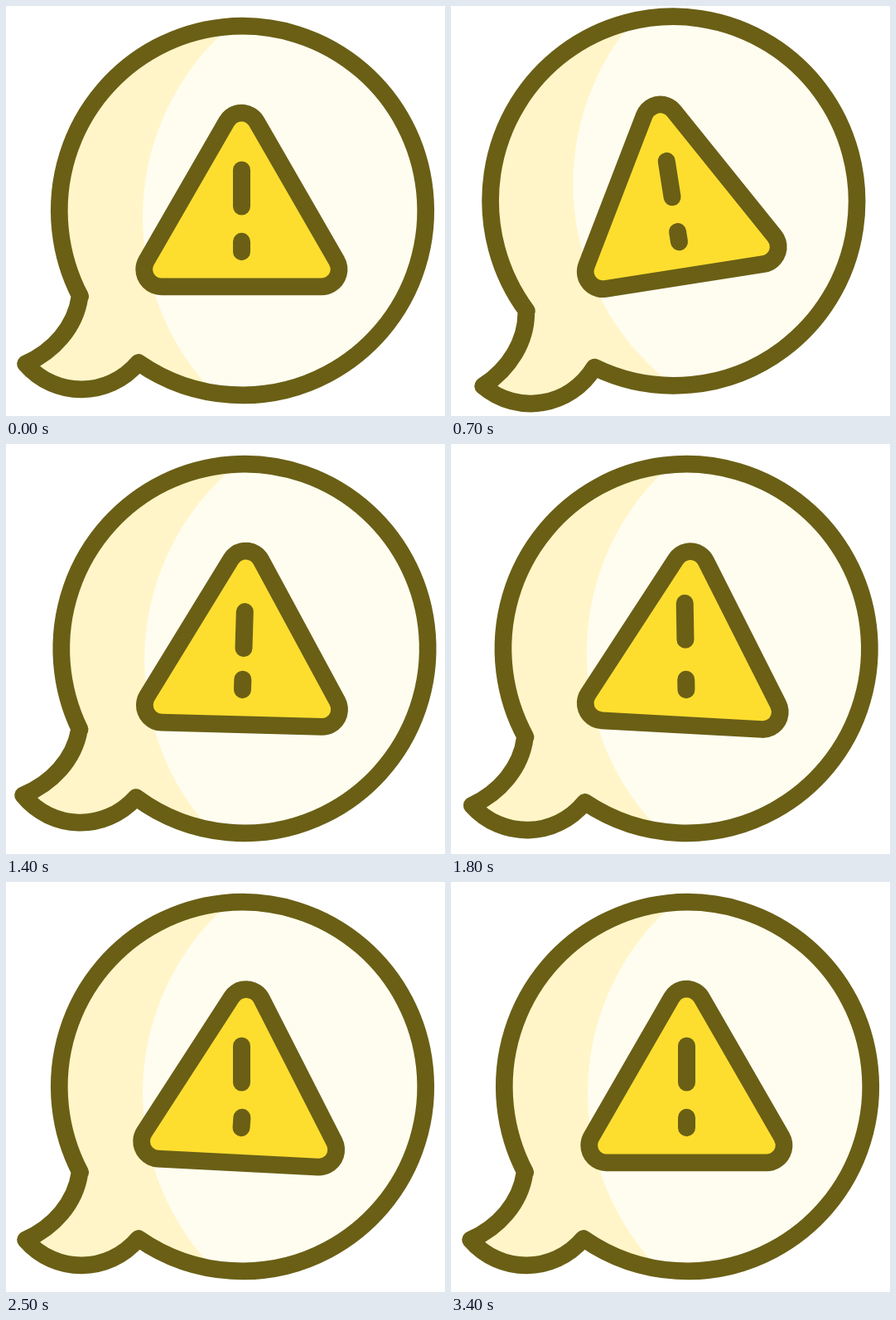
Recreate the animation shown at these times as an HTML page with a canvas. Size 530 px wide and 495 px high, loop 3.5 s.

```html
<!DOCTYPE html>
<html lang="en">
<head>
<meta charset="utf-8">
<title>Warning bubble</title>
<style>
html, body { margin: 0; width: 530px; height: 495px; overflow: hidden; background: #fff; }
canvas { display: block; }
</style>
</head>
<body>
<canvas id="stage" width="530" height="495"></canvas>
<script>
const ctx = document.getElementById('stage').getContext('2d');
const LOOP = 3500, STEP = 100;
const INK = '#6a5f15', SHADE = '#fff5c8', CREAM = '#fffdf0', YELLOW = '#fdde2f';
const CX = 285.5, CY = 247, RX = 221.2, RY = 222.8;

const clamp = x => Math.min(1, Math.max(0, x));
const ease = s => s * s * s * (10 - 15 * s + 6 * s * s);

// Starts at 0 and eases to each [from, to, value] stop in turn.
const swing = (...stops) => t => {
  let v = 0;
  for (const [from, to, value] of stops) v += (value - v) * ease(clamp((t - from) / (to - from)));
  return v;
};

// Wind up, snap back, then settle.
const tilt = swing([0, 430, 9], [540, 740, -10], [900, 1210, 4], [1210, 1620, -1.3], [1620, 2100, 0]);
const lift = swing([540, 740, 1], [870, 1210, 0]);
const signTilt = swing([700, 1000, -6], [1000, 1740, 4.1], [2200, 3000, 0]);
const barDrop = swing([700, 1100, 10.5], [1100, 1800, -5.7], [1800, 2300, 0]);
const dotTilt = swing([2100, 2500, 4], [2500, 2900, 0]);

function bubblePath() {
  const angle = (x, y) => Math.atan2((y - CY) / RY, (x - CX) / RX);
  const p = new Path2D();
  p.ellipse(CX, CY, RX, RY, 0, angle(89, 351), angle(159.5, 431) + 2 * Math.PI);
  p.bezierCurveTo(123.6, 473.5, 59.4, 473.5, 23.5, 432);
  p.bezierCurveTo(57.2, 417, 83.9, 387.5, 89, 351);
  p.closePath();
  return p;
}

const bubble = bubblePath();
const triangle = new Path2D('M284.4 150L381.2 318H187.6Z');

function scoped(fn) {
  ctx.save();
  fn();
  ctx.restore();
}

function spin(deg, x, y) {
  ctx.translate(x, y);
  ctx.rotate(deg * Math.PI / 180);
  ctx.translate(-x, -y);
}

function outline(path, color, width) {
  ctx.strokeStyle = color;
  ctx.lineWidth = width;
  ctx.stroke(path);
}

function padded(path, color, width) {
  ctx.fillStyle = color;
  ctx.fill(path);
  outline(path, color, width);
}

const dash = (y, length) => outline(new Path2D(`M284.5 ${y}v${length}`), INK, 21);

function drawBubble() {
  scoped(() => {
    ctx.clip(bubble);
    ctx.fillStyle = SHADE;
    ctx.fillRect(0, 0, 530, 495);
    ctx.fillStyle = CREAM;
    ctx.beginPath();
    ctx.arc(469.5, 255, 304.5, 0, 2 * Math.PI);
    ctx.fill();
  });
  outline(bubble, INK, 20.7);
}

function drawSign(t) {
  scoped(() => {
    spin(signTilt(t), 279, 256);
    padded(triangle, INK, 62.5);
    padded(triangle, YELLOW, 21);
  });
  dash(198 + barDrop(t), 44);
  scoped(() => {
    spin(dotTilt(t), 284.5, 290.5);
    dash(284.3, 12.4);
  });
}

function draw(t) {
  ctx.fillStyle = '#fff';
  ctx.fillRect(0, 0, 530, 495);
  ctx.lineCap = ctx.lineJoin = 'round';
  scoped(() => {
    ctx.translate(1.45 * tilt(t) - 4 * lift(t), -12.2 * lift(t));
    spin(tilt(t), CX, CY);
    drawBubble();
    drawSign(t);
  });
}

let start;
function tick(now) {
  start ??= now;
  const t = (now - start) % LOOP;
  draw(Math.floor(t / STEP) * STEP);
  requestAnimationFrame(tick);
}
draw(0);
requestAnimationFrame(tick);
</script>
</body>
</html>
```
